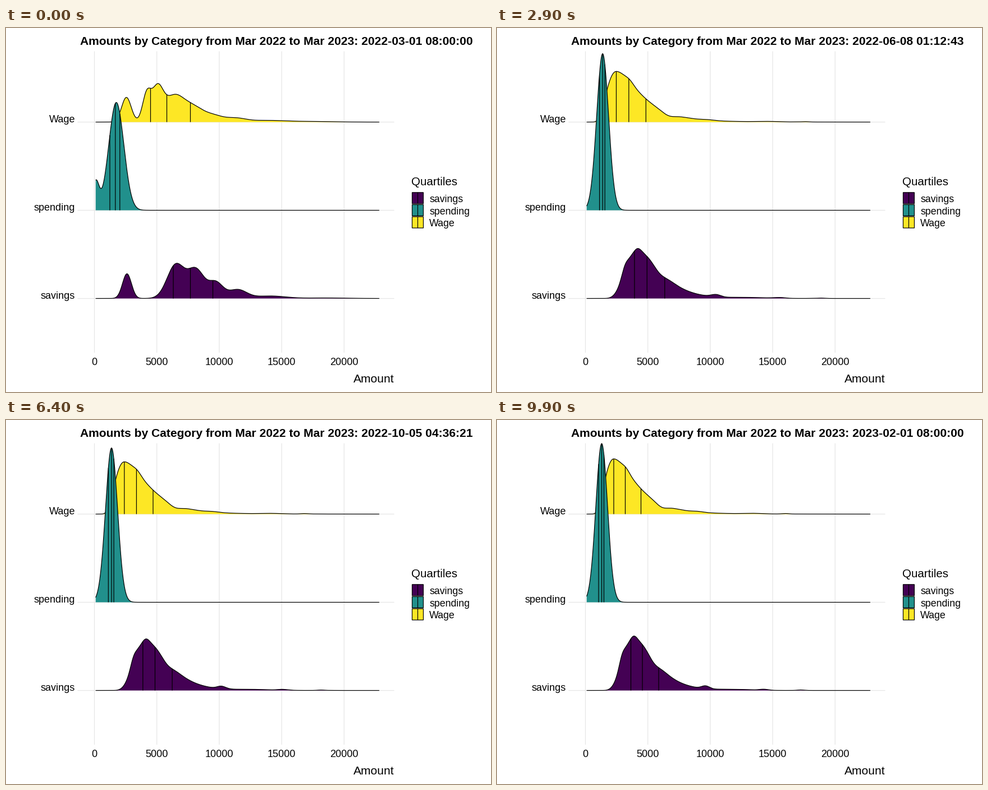
These frames come from a looping animation (864x648 px, 10000 ms). A matplotlib script:

```python
import numpy as np
import matplotlib.pyplot as plt
from matplotlib.animation import FuncAnimation
from matplotlib.patches import Polygon, Rectangle

W, H, DPI = 864, 648, 100
FRAMES, STEP = 100, 9          # STEP: frames between two months
PX = 72 / DPI                  # points per pixel
LINE = 1.2 * PX
GRID = "#E5E5E5"
ZERO = 157                     # x position of amount 0

plt.rcParams["font.family"] = ["Liberation Sans", "DejaVu Sans"]
plt.rcParams["path.snap"] = False

X = np.linspace(159.2, 664.5, 700)


def hills(x, *parts):
    """Sum of bell curves given as (mode, width, height)."""
    return sum(h * np.exp(-((x - m) / w) ** 2 / 2) for m, w, h in parts)


def skewed(x, mode, left, right, height):
    """Bell over log amount with its own width on each side of the mode."""
    d = np.log(np.maximum(x - ZERO, 1) / (mode - ZERO))
    return height * np.exp(-(d / np.where(d < 0, left, right)) ** 2 / 2)


def wage_march(x):
    return hills(x, (214, 8.6, 44), (250, 7.5, 47), (269, 10, 55),
                 (299, 18, 46), (334, 17, 23), (368, 17, 11),
                 (408, 18, 6.5), (465, 35, 3), (550, 35, 1))


def wage(x):
    return skewed(x, 207.5, 0.375, 0.54, 98.3) + hills(
        x, (230, 6, 4), (293, 10, -6), (357, 9, 1.2), (455, 16, 1),
        (513, 6, 0.9))


def spending_march(x):
    return hills(x, (159.5, 5.8, 49), (196, 13.5, 192))


def spending(x):
    return hills(x, (186, 10.45, 282.6))


def savings_march(x):
    return hills(x, (215, 8, 44), (302, 15.5, 60), (338, 14.5, 50),
                 (373, 13, 28), (412, 16, 15.5), (470, 28, 4.5),
                 (570, 35, 1))


def savings(x):
    return skewed(x, 243, 0.265, 0.35, 92) + hills(
        x, (222, 5, 11), (244, 5, 5), (279, 9, -7), (371, 7, 5),
        (425, 30, 1.7), (475, 8, 1.8), (540, 6, 1))


def month(shape, quartiles, scale=1.0, shift=0.0):
    """Outline heights, quartile positions and quartile heights."""
    q = np.array(quartiles, float)
    return shape((X - shift) / scale) / scale, q * scale + shift, shape(q) / scale


def series(march, march_q, shape, quartiles, scales, shifts):
    return [month(march, march_q)] + [month(shape, quartiles, s, b)
                                      for s, b in zip(scales, shifts)]


# Amounts from April to February grow with the weekdays of the month.
firsts = np.arange("2022-04", "2023-04", dtype="datetime64[M]")
firsts = firsts.astype("datetime64[D]")
days = np.busday_count(firsts[:-1], firsts[1:])
rate = days / days[-1]

# Spending drifts slowly: mode and peak at a few months, linear in between.
keys = [0, 2, 5, 9, 10]
mode = np.interp(np.arange(11), keys, [189.3, 187.7, 187.3, 188, 186])
spread = 282.6 / np.interp(np.arange(11), keys, [272, 279, 277, 269, 282.6])

ROWS = [  # label, baseline, colour, months; drawn back to front
    ("Wage", 167, "#FDE725",
     series(wage_march, (257, 286, 328), wage, (207.5, 228, 256),
            rate, ZERO * (1 - rate))),
    ("spending", 324, "#21908C",
     series(spending_march, (184.5, 194.3, 202.3), spending,
            (180.5, 186, 190), spread, mode - 186 * spread)),
    ("savings", 481, "#440154",
     series(savings_march, (297.5, 328, 368), savings, (238, 258.5, 287.5),
            rate, 205 * (1 - rate) + 3.5 * (rate > 1))),
]

fig = plt.figure(figsize=(W / DPI, H / DPI), dpi=DPI, facecolor="white")
ax = fig.add_axes([0, 0, 1, 1])
ax.set_xlim(-0.5, W - 0.5)
ax.set_ylim(H - 0.5, -0.5)
ax.axis("off")


def text(x, y, s, size, **kw):
    return ax.text(x, y, s, fontsize=size * PX, va="baseline", **kw)


def line(xs, ys, color="black", z=1.0):
    return ax.plot(xs, ys, color=color, lw=LINE, zorder=z,
                   solid_capstyle="butt", solid_joinstyle="round")[0]


for k in range(5):
    gx = ZERO + 111.2 * k
    line([gx, gx], [41, 577.5], GRID)
    text(gx - 0.3, 599, str(5000 * k), 18, ha="center")
for label, base, _, _ in ROWS:
    line([127, 691], [base, base], GRID)
    text(122.5, base + 0.5, label, 18, ha="right")
text(691, 630.5, "Amount", 21, ha="right")

text(721.5, 279, "Quartiles", 20.5)
for k, (label, _, color, _) in enumerate(reversed(ROWS)):
    top = 292.3 + 21.6 * k
    ax.add_patch(Rectangle((723, top), 20, 20, fc=color, ec="black",
                           lw=LINE, zorder=2))
    line([733, 733], [top, top + 20], z=3)
    text(753.7, 309.5 + 21.6 * k, label, 17.8)

title = text(132, 29, "", 20.97, weight="bold")

ridges = []
for z, (_, base, color, months) in enumerate(ROWS):
    fill = Polygon([(0, 0), (1, 0), (1, 1)], fc=color, ec="none",
                   zorder=4 + z)
    ax.add_patch(fill)
    ridges.append((base, months, fill, line([], [], z=4.3 + z),
                   [line([], [], z=4.6 + z) for _ in range(3)]))

START = np.datetime64("2022-03-01T08:00:00")
SPAN = 337 * 86400


def draw(i):
    now = START + np.timedelta64(SPAN * i // (FRAMES - 1), "s")
    title.set_text("Amounts by Category from Mar 2022 to Mar 2023: "
                   + str(now).replace("T", " "))
    k = min(i // STEP, 10)
    t = (i - k * STEP) / STEP
    for base, months, fill, edge, marks in ridges:
        h, qx, qh = [(1 - t) * a + t * b
                     for a, b in zip(months[k], months[k + 1])]
        y = base - h
        fill.set_xy(np.vstack([(X[0], base), np.column_stack([X, y]),
                               (X[-1], base)]))
        edge.set_data(X, y)
        for mark, x, top in zip(marks, qx, qh):
            mark.set_data([x, x], [base, base - top])
    return []


anim = FuncAnimation(fig, draw, frames=FRAMES, interval=100, repeat=True,
                     repeat_delay=0, blit=False)
plt.show()
```
